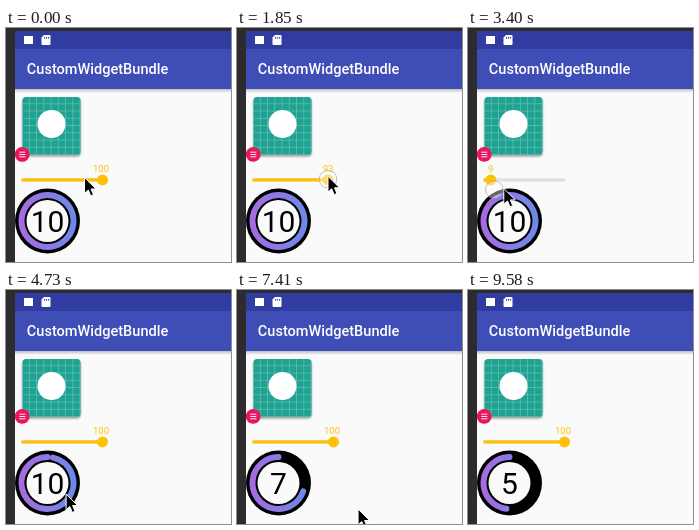
Animation, 225 px wide and 234 px high, one loop 9.68 s. Source, as an HTML page:

```html
<!DOCTYPE html>
<html lang="en">
<head>
<meta charset="utf-8">
<title>CustomWidgetBundle</title>
<style>
html, body { margin: 0; width: 100%; height: 100%; overflow: hidden; background: #2c2c2e; }
svg { display: block; width: 100vw; height: 100vh; font-family: Roboto, "Open Sans", sans-serif; }
</style>
</head>
<body>
<svg viewBox="0 0 225 234">
  <defs>
    <linearGradient id="drop" x2="0" y2="1">
      <stop stop-color="#000" stop-opacity=".24"/>
      <stop offset="1" stop-color="#000" stop-opacity="0"/>
    </linearGradient>
    <linearGradient id="hue" gradientUnits="userSpaceOnUse" x1="13" y1="193" x2="70" y2="193">
      <stop stop-color="#a86ae0"/>
      <stop offset="1" stop-color="#6a8ae8"/>
    </linearGradient>
    <pattern id="grid" x="16.5" y="69" width="7.25" height="7.25" patternUnits="userSpaceOnUse">
      <path d="M6.9 0V7.25M0 6.9H7.25" stroke="#6cc4b8" stroke-width=".7"/>
    </pattern>
    <filter id="soft" x="-20%" y="-20%" width="140%" height="140%">
      <feGaussianBlur stdDeviation="1"/>
    </filter>
  </defs>

  <!-- screen and bars -->
  <rect width="225" height="234" fill="#2c2c2e"/>
  <rect x="9" y="3" width="216" height="231" fill="#fafafa"/>
  <rect x="9" y="3" width="216" height="18" fill="#303c9f"/>
  <rect x="9" y="21" width="216" height="40" fill="#3f4eb7"/>
  <rect x="9" y="61" width="216" height="4" fill="url(#drop)"/>
  <rect x="18" y="8" width="9" height="8" fill="#fff"/>
  <path d="M38 7h5.500q1 0 1 1v8q0 1-1 1h-7q-1 0-1-1V9.500z" fill="#fff"/>
  <path d="M38.600 8.800v2M40.600 8.800v2M42.600 8.800v2" stroke="#303c9f" stroke-width=".9"/>
  <text x="20.8" y="46.400" font-size="14.55" font-weight="500" fill="#fff">CustomWidgetBundle</text>

  <!-- tile and badge -->
  <rect x="16.500" y="70.500" width="58" height="58" rx="4" opacity=".4" filter="url(#soft)"/>
  <rect x="16.500" y="69" width="58" height="58" rx="3.500" fill="#1fa292"/>
  <rect x="16.500" y="69" width="58" height="58" rx="3.500" fill="url(#grid)"/>
  <circle cx="45.500" cy="96" r="14" fill="#fff"/>
  <circle cx="16.200" cy="126.400" r="7.400" fill="#e8175d"/>
  <path d="M13.300 124.200h6M13.300 126.500h6M13.300 128.800h6" stroke="#fff" stroke-width=".9"/>

  <!-- slider -->
  <rect x="15.500" y="150.300" width="81.500" height="3.200" fill="#e0e0e0"/>
  <rect id="fill" x="15.500" y="150.300" height="3.200" fill="#ffc107"/>
  <circle id="thumb" cy="151.900" r="5.500" fill="#ffc107"/>
  <text id="label" y="143.800" font-size="9.5" text-anchor="middle" fill="#ffc107"></text>

  <!-- countdown -->
  <circle cx="41.500" cy="193" r="32.500"/>
  <circle cx="41.500" cy="193" r="21" fill="#fafafa"/>
  <path id="arc" fill="none" stroke="url(#hue)" stroke-width="6" stroke-linecap="round"/>
  <text id="count" x="41.500" y="204.200" font-size="30" text-anchor="middle"></text>

  <circle id="touch" r="8.800" fill="#fff" fill-opacity=".4" stroke="#999" stroke-opacity=".6"/>
  <path id="arrow" d="M0 0V15.800L3.700 12.500L6.200 18.400L8.900 17.200L6.500 11.500H11.500Z" stroke="#fff"/>
</svg>
<script>
const LOOP = 9680, LAST = 9580, START = 4390, TAU = 2 * Math.PI;
const el = id => document.getElementById(id);
const [fill, thumb, label, arc, count, touch, arrow] =
  ["fill", "thumb", "label", "arc", "count", "touch", "arrow"].map(el);
const clamp = (v, lo, hi) => Math.min(hi, Math.max(lo, v));
const set = (node, attrs) => {
  for (const name in attrs) node.setAttribute(name, attrs[name]);
};
const show = (node, on) => { node.style.display = on ? "" : "none"; };

// turning points of the pointer: time, x, y
const turns = [
  [0, 78.5, 149.5], [220, 91, 149], [970, 33.5, 147], [1670, 91, 147],
  [1950, 91, 149], [3230, 22, 157], [3285, 22, 157], [4000, 107, 178],
  [START, 42, 193], [4730, 60, 204], [5600, 150, 204], [6500, 154, 208],
  [7410, 121, 219], [8100, 165, 222], [9260, 150, 236]
];

function pointer(t) {
  const next = turns.findIndex(p => p[0] > t);
  const i = next < 0 ? turns.length - 1 : Math.max(next, 1);
  const [ta, xa, ya] = turns[i - 1], [tb, xb, yb] = turns[i];
  const k = clamp((t - ta) / (tb - ta), 0, 1);
  return [xa + (xb - xa) * k, ya + (yb - ya) * k];
}

// the thumb trails the pointer while it is dragged
function drawSlider(t) {
  const dragged = t > 310 && t < 4100;
  const x = dragged ? clamp(pointer(t - 110)[0], 15.5, 96.5) : 96.5;
  set(fill, { width: x - 15.5 });
  set(thumb, { cx: x });
  set(label, { x: Math.min(x, 95) });
  label.textContent = Math.round((x - 15.5) / 0.81);
}

function drawCountdown(t) {
  const left = clamp(10 - (t - START) / 1000, 0, 10);
  const a = Math.min(left / 10, 0.9999) * TAU;
  const x = 41.5 - 26 * Math.sin(a), y = 193 - 26 * Math.cos(a);
  set(arc, { d: `M41.5 167A26 26 0 ${+(a > Math.PI)} 0 ${x} ${y}` });
  count.textContent = Math.ceil(left);
}

function drawPointer(t) {
  const [x, y] = pointer(t);
  const [cx, cy] = pointer(t - 80);
  set(arrow, { transform: `translate(${x} ${y})` });
  set(touch, { cx, cy: cy + 3.5 });
  show(arrow, t < 9270);
  show(touch, (t > 230 && t < 4050) || (t > START && t < START + 120));
}

const t0 = performance.now();
function tick() {
  const t = Math.min((performance.now() - t0) % LOOP, LAST);
  drawSlider(t);
  drawCountdown(t);
  drawPointer(t);
  requestAnimationFrame(tick);
}
tick();
</script>
</body>
</html>
```
